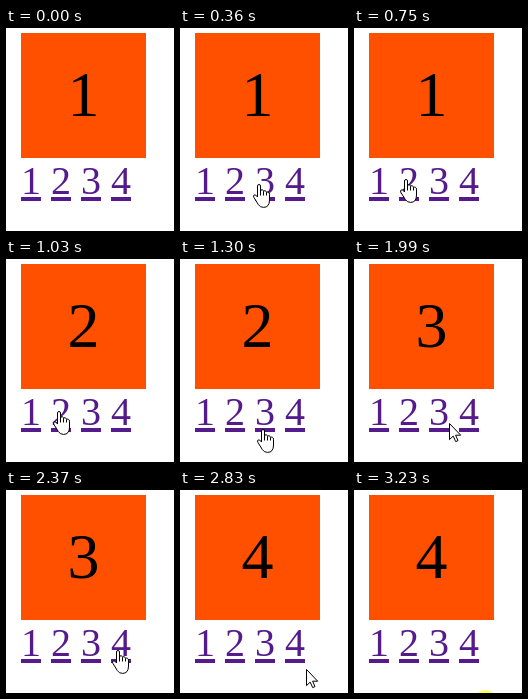
Recreate the animation shown at these times as an HTML page with a canvas. Size 168 by 203 pixels, loop 3380 ms.

```html
<!DOCTYPE html>
<html lang="en">
<head>
<meta charset="utf-8">
<title>Linked digits</title>
<style>
  html, body { margin: 0; width: 100%; height: 100%; overflow: hidden; background: #fff; }
  canvas { display: block; width: 168px; height: 203px; }
</style>
</head>
<body>
<canvas id="stage"></canvas>
<script>
const W = 168, H = 203, LOOP = 3380, TICK = 76.3;
const SERIF = '"Liberation Serif", "Times New Roman", serif';
const canvas = document.getElementById('stage');
const ctx = canvas.getContext('2d');
const dpr = window.devicePixelRatio || 1;
canvas.width = Math.round(W * dpr);
canvas.height = Math.round(H * dpr);

// The pointer glides along one curve per move and rests in between.
const entry = [110, 210];
const moves = [
  { from: 0, to: 670, bend: [72, 125], end: [52, 151] },
  { from: 980, to: 1290, bend: [70, 162], end: [83, 170] },
  { from: 1300, to: 1600, bend: [89, 170], end: [89, 157] },
  { from: 1830, to: 2290, bend: [97, 172], end: [112, 160] },
  { from: 2590, to: 2990, bend: [128, 162], end: [131, 212] }
];

// Button held down; the last press misses the links.
const presses = [
  { from: 900, to: 980, link: 2 },
  { from: 1680, to: 1830, link: 3 },
  { from: 2450, to: 2530, link: 4 },
  { from: 3230, to: LOOP, link: 0 }
];

const arrow = new Path2D('M.5 .5V16.6L4.2 13.1L6.7 18.6L9 17.6L6.6 12.2H11.7Z');
const hand = new Path2D(
  'M4.5 13V2Q4.5 .5 6 .5Q7.5 .5 7.5 2V7Q7.8 5.5 9.2 5.7Q10.5 6 10.5 7.5' +
  'Q10.8 6.5 12.2 6.8Q13.5 7.1 13.5 8.6Q14 7.8 15.3 8.2Q16.5 8.7 16.5 10.2' +
  'V16Q16.5 23.4 10.5 23.4Q7 23.4 5.3 20.5L1 13.6' +
  'Q-.1 11.8 1.2 10.9Q2.6 10.2 4.5 13Z');
const knuckles = new Path2D('M7.5 7V11.5M10.5 7.5V11.5M13.5 8.6V11.5');

const linkX = n => 15 + 30 * (n - 1);

function curve(a, b, c, u) {
  return (1 - u) ** 2 * a + 2 * u * (1 - u) * b + u * u * c;
}

function pointerAt(t) {
  const time = Math.floor(t / TICK) * TICK;
  let pos = entry;
  for (const { from, to, bend, end } of moves) {
    if (time < from) break;
    const u = Math.min(1, (time - from) / (to - from));
    pos = pos.map((p, i) => Math.round(curve(p, bend[i], end[i], u)));
  }
  return pos;
}

function overLink(x, y) {
  if (y < 131 || y >= 177) return false;
  return [1, 2, 3, 4].some(n => x >= linkX(n) && x < linkX(n) + 20);
}

function text(str, x, y, size, color) {
  ctx.font = `${size}px ${SERIF}`;
  ctx.fillStyle = color;
  ctx.fillText(str, x, y);
}

function drawLink(n, active) {
  const color = active ? '#f00' : '#551a8b';
  text(n, linkX(n), 166, 40, color);
  ctx.fillRect(linkX(n), 169, 20, 4);
}

function drawPointer(x, y) {
  const isHand = overLink(x, y);
  const shape = isHand ? hand : arrow;
  ctx.save();
  ctx.translate(isHand ? x - 6 : x, y);
  ctx.lineWidth = 1;
  ctx.lineJoin = 'round';
  ctx.strokeStyle = '#000';
  ctx.fillStyle = '#fff';
  ctx.fill(shape);
  ctx.stroke(shape);
  if (isHand) ctx.stroke(knuckles);
  ctx.restore();
}

function draw(t) {
  const press = presses.find(p => t >= p.from && t < p.to);
  const digit = 1 + presses.filter(p => t >= p.to).length;
  const [x, y] = pointerAt(t);

  ctx.setTransform(dpr, 0, 0, dpr, 0, 0);
  ctx.fillStyle = '#fff';
  ctx.fillRect(0, 0, W, H);
  ctx.fillStyle = '#ff5000';
  ctx.fillRect(15, 5, 125, 125);
  text(digit, 61.5, 88, 64, '#000');

  for (let n = 1; n <= 4; n++) drawLink(n, press && press.link === n);

  if (press) {
    ctx.fillStyle = 'rgba(255, 255, 0, .62)';
    ctx.beginPath();
    ctx.arc(x, y, 12, 0, Math.PI * 2);
    ctx.fill();
  }
  drawPointer(x, y);
}

const start = performance.now();
function tick() {
  draw((performance.now() - start) % LOOP);
  requestAnimationFrame(tick);
}
tick();
</script>
</body>
</html>
```
